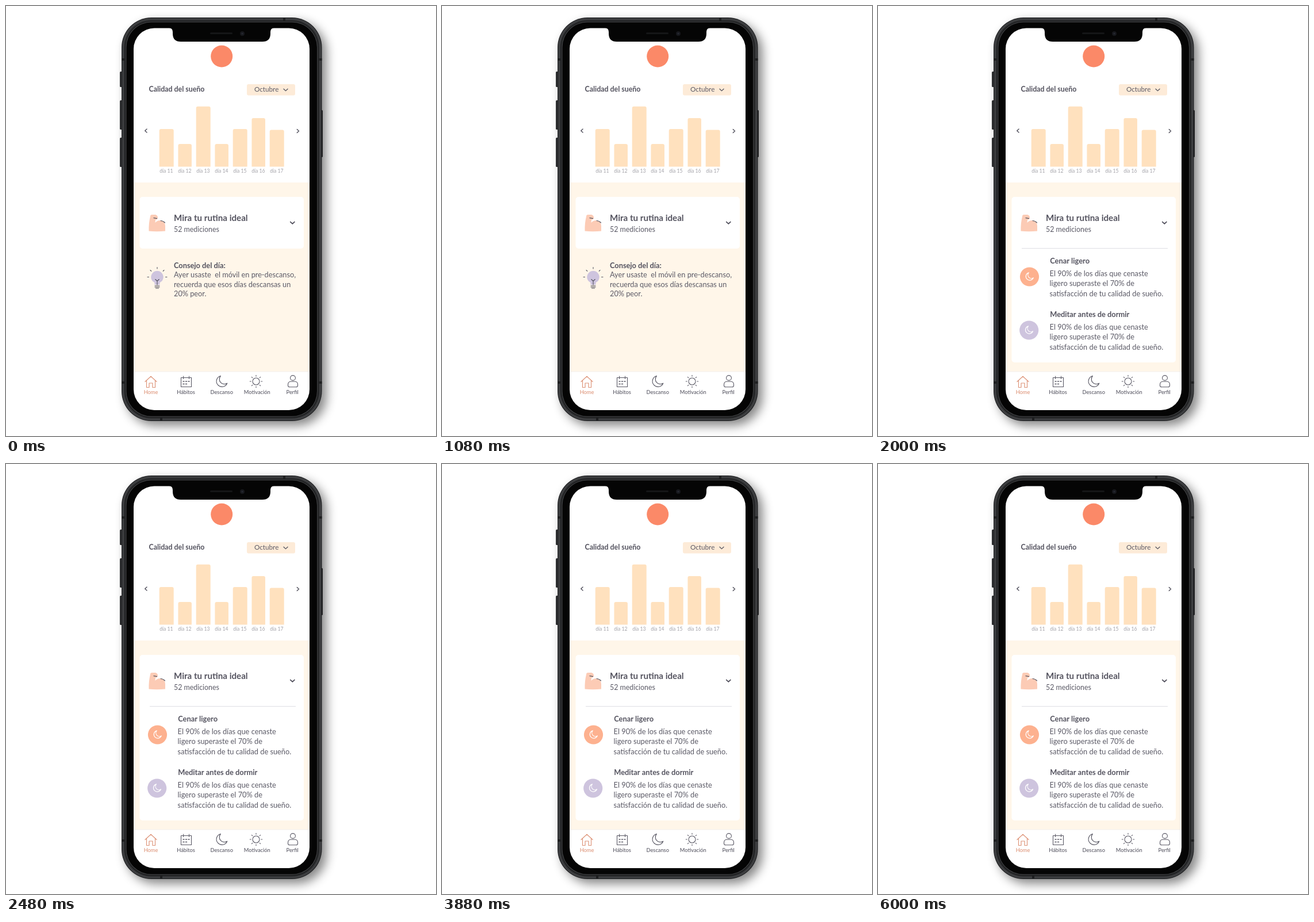
Animation of 748x748 px, one loop 6.28 s. Source, as an HTML page with a canvas:

```html
<!DOCTYPE html>
<html lang="es">
<head>
<meta charset="utf-8">
<title>Calidad del sueño</title>
<style>
  html, body { margin: 0; width: 100%; height: 100%; overflow: hidden; background: #fff; }
  canvas { display: block; width: 748px; height: 748px; }
</style>
</head>
<body>
<canvas id="stage" width="748" height="748"></canvas>
<script>
const ctx = document.getElementById('stage').getContext('2d');
const LOOP = 6280, OPEN_AT = 1200;
const INK = '#5b5a66', DARK = '#54535f', CORAL = '#de957a', CREAM = '#fff6e9';
const PEACH = '#ffe1be', LILAC = '#cec4de', SALMON = '#fdb18f';

function box(x, y, w, h, r, fill) {
  ctx.beginPath();
  ctx.roundRect(x, y, w, h, r);
  ctx.fillStyle = fill;
  ctx.fill();
}

function disc(x, y, r, fill) {
  ctx.beginPath();
  ctx.arc(x, y, r, 0, Math.PI * 2);
  ctx.fillStyle = fill;
  ctx.fill();
}

function line(d, color = INK, width = 1.1, fill) {
  const path = new Path2D(d);
  if (fill) {
    ctx.fillStyle = fill;
    ctx.fill(path);
  }
  ctx.strokeStyle = color;
  ctx.lineWidth = width;
  ctx.lineCap = ctx.lineJoin = 'round';
  ctx.stroke(path);
}

function text(str, x, y, size, weight = 400, color = INK, align = 'left') {
  ctx.font = `${weight} ${size}px Lato, sans-serif`;
  ctx.textAlign = align;
  ctx.fillStyle = color;
  ctx.fillText(str, x, y);
}

function lines(rows, x, y, step, size) {
  rows.forEach((row, i) => text(row, x, y + i * step, size));
}

function rays(x, y, r1, r2, from, to, step) {
  ctx.beginPath();
  for (let a = from; a <= to; a += step) {
    const c = Math.cos(a * Math.PI / 180), s = Math.sin(a * Math.PI / 180);
    ctx.moveTo(x + c * r1, y + s * r1);
    ctx.lineTo(x + c * r2, y + s * r2);
  }
  ctx.stroke();
}

function moon(x, y, k, color, width) {
  ctx.save();
  ctx.translate(x, y);
  ctx.scale(k, k);
  line('M-2 -9.5 A9.6 9.6 0 1 0 9.4 3.2 A8.6 8.6 0 0 1 -2 -9.5 Z', color, width / k);
  ctx.restore();
}

function phone() {
  for (const [x, y, w, h] of [[198, 114, 5, 27], [198, 164, 5, 51], [198, 229, 5, 51], [547, 181, 4, 82]])
    box(x, y, w, h, 1.5, '#303133');
  ctx.save();
  ctx.shadowColor = 'rgba(0,0,0,.48)';
  ctx.shadowBlur = 18;
  ctx.shadowOffsetX = 8;
  ctx.shadowOffsetY = 8;
  box(201, 20, 348.5, 702, 52, '#252628');
  ctx.restore();
  [[1.5, '#414244'], [3.5, '#333436'], [5.5, '#1b1c1d'], [7, '#3a3b3d'], [8.5, '#050505']].forEach(([d, fill]) =>
    box(201 + d, 20 + d, 348.5 - 2 * d, 702 - 2 * d, 52 - d, fill));
  for (const y of [91, 653]) {
    box(201, y, 5, 4, 0, '#1d1e1f');
    box(544.5, y, 5, 4, 0, '#1d1e1f');
  }
  box(268, 716, 4, 5, 0, '#1d1e1f');
  box(482, 21, 4, 5, 0, '#1d1e1f');
  box(222, 38.5, 306, 664.5, 36, '#fff');
}

function notch() {
  ctx.fillStyle = '#050505';
  ctx.fill(new Path2D('M284 38 Q290 39 290 45 V48 Q290 62 304 62 H446 Q460 62 460 48 V45 Q460 39 466 38 Z'));
  box(355, 46, 39, 3, 1.5, '#151617');
  disc(411, 48, 4, '#17181c');
  disc(411, 48, 1.6, '#272a33');
}

function chart() {
  text('Calidad del sueño', 248.5, 149, 12.4, 700, DARK);
  box(419, 136, 84, 19.5, 3, '#fdebd8');
  text('Octubre', 432, 149, 11.7);
  line('M483 144.3 L486.5 147.6 L490 144.3', DARK, 1.3);
  line('M245 214 L241.8 217 L245 220', DARK, 1.5);
  line('M506.3 214.5 L509.5 217.5 L506.3 220.5', DARK, 1.5);
  const tops = [214, 240, 174.8, 240, 214, 195, 215.5];
  tops.forEach((top, i) => {
    const w = i % 2 ? 23.5 : 25, mid = 279.2 + i * 32;
    box(mid - w / 2, top, w, 279.5 - top, [3, 3, 0, 0], PEACH);
    text('día ' + (11 + i), mid - .3, 290, 8.6, 400, '#a3a2a8', 'center');
  });
}

function arm() {
  ctx.fillStyle = '#fccbb5';
  ctx.fill(new Path2D('M251 366 Q251 363 254 363 H260 Q264 364 264 368 Q264 371 260 372 L259.5 377 Q263 373 268 373 Q277 374 277 383 V391.5 Q262 393 248.5 391.5 Q248 378 251 366 Z'));
  line('M257 368.6 L262.5 369.6', DARK, 1.2);
  line('M269 373.5 Q273 373.5 276.5 377', DARK, 1.1);
}

function bulb() {
  disc(263, 471.5, 10.7, LILAC);
  box(258.5, 479, 9, 6, 0, LILAC);
  line('M259.8 475.5 L263 478.5 L266.2 475.5 M263 478.5 V485', DARK, 1.1);
  line('M259 486.8 H267 M259 489 H267 M260.5 491 H265.5', DARK, 1.1);
  rays(263, 471.5, 14.5, 17, 180, 360, 45);
}

function habit(y, color, x, title) {
  disc(x, y + 27.5, 16.6, color);
  moon(x + .2, y + 27, .7, '#fff', 1.2);
  text(title, 299.2, y + 4.2, 12.85, 700, DARK);
  lines(['El 90% de los días que cenaste', 'ligero superaste el 70% de', 'satisfacción de tu calidad de sueño.'],
    298.6, y + 26.2, 17.5, 12.8);
}

function card(open) {
  box(222, 307, 306, 329, 0, CREAM);
  box(232.5, 332, 285.5, open ? 288 : 90, 5, '#fff');
  arm();
  text('Mira tu rutina ideal', 292, 374, 15.15, 700, DARK);
  text('52 mediciones', 292, 393, 12.4);
  line('M494.8 375.6 L498.3 378.9 L501.8 375.6', DARK, 1.9);
  if (open) {
    box(250, 421, 254, 1.2, 0, '#e3e3e8');
    habit(443.5, SALMON, 263.5, 'Cenar ligero');
    habit(536.5, LILAC, 262.7, 'Meditar antes de dormir');
  } else {
    bulb();
    text('Consejo del día:', 292, 455.5, 12.8, 700, DARK);
    lines(['Ayer usaste  el móvil en pre-descanso,', 'recuerda que esos días descansas un', '20% peor.'],
      292, 472, 16.5, 12.72);
  }
}

function tabs() {
  box(222, 635.5, 306, 1, 0, '#f3efeb');
  line('M242 653.5 L252 644.3 L262 653.5 M244.5 651.5 V663.5 H249 V656 H255 V663.5 H259.5 V651.5', CORAL, 1.2);
  line('M304.5 646.5 H322.5 V662.5 H304.5 Z M308.5 644 V648.5 M318.5 644 V648.5');
  line('M308 653 H310 M312.5 653 H314.5 M317 653 H319 M308 657.5 H310 M312.5 657.5 H314.5', INK, 1.5);
  moon(375.3, 653, 1, INK, 1.2);
  line('M441 653 A6 6 0 1 1 429 653 A6 6 0 1 1 441 653 Z');
  rays(435, 653, 8.8, 10.7, 0, 315, 45);
  line('M503.4 647 A4.4 4.4 0 1 1 494.6 647 A4.4 4.4 0 1 1 503.4 647 Z');
  line('M494.5 653.3 H503.5 Q507.5 654 507.5 659 V660 Q507.5 662.8 504.5 662.8 H493.5 Q490.5 662.8 490.5 660 V659 Q490.5 654 494.5 653.3 Z');
  [['Home', 252], ['Hábitos', 313], ['Descanso', 375.2], ['Motivación', 436.8], ['Perfil', 498.2]].forEach(([name, x], i) =>
    text(name, x, 675, 9.25, 500, i ? INK : CORAL, 'center'));
}

function draw(t) {
  ctx.fillStyle = '#fff';
  ctx.fillRect(0, 0, 748, 748);
  phone();
  card(t >= OPEN_AT);
  chart();
  tabs();
  notch();
  disc(375.2, 87.5, 19, '#fb8968');
}

const start = performance.now();
function tick() {
  draw((performance.now() - start) % LOOP);
  requestAnimationFrame(tick);
}
tick();
</script>
</body>
</html>
```
